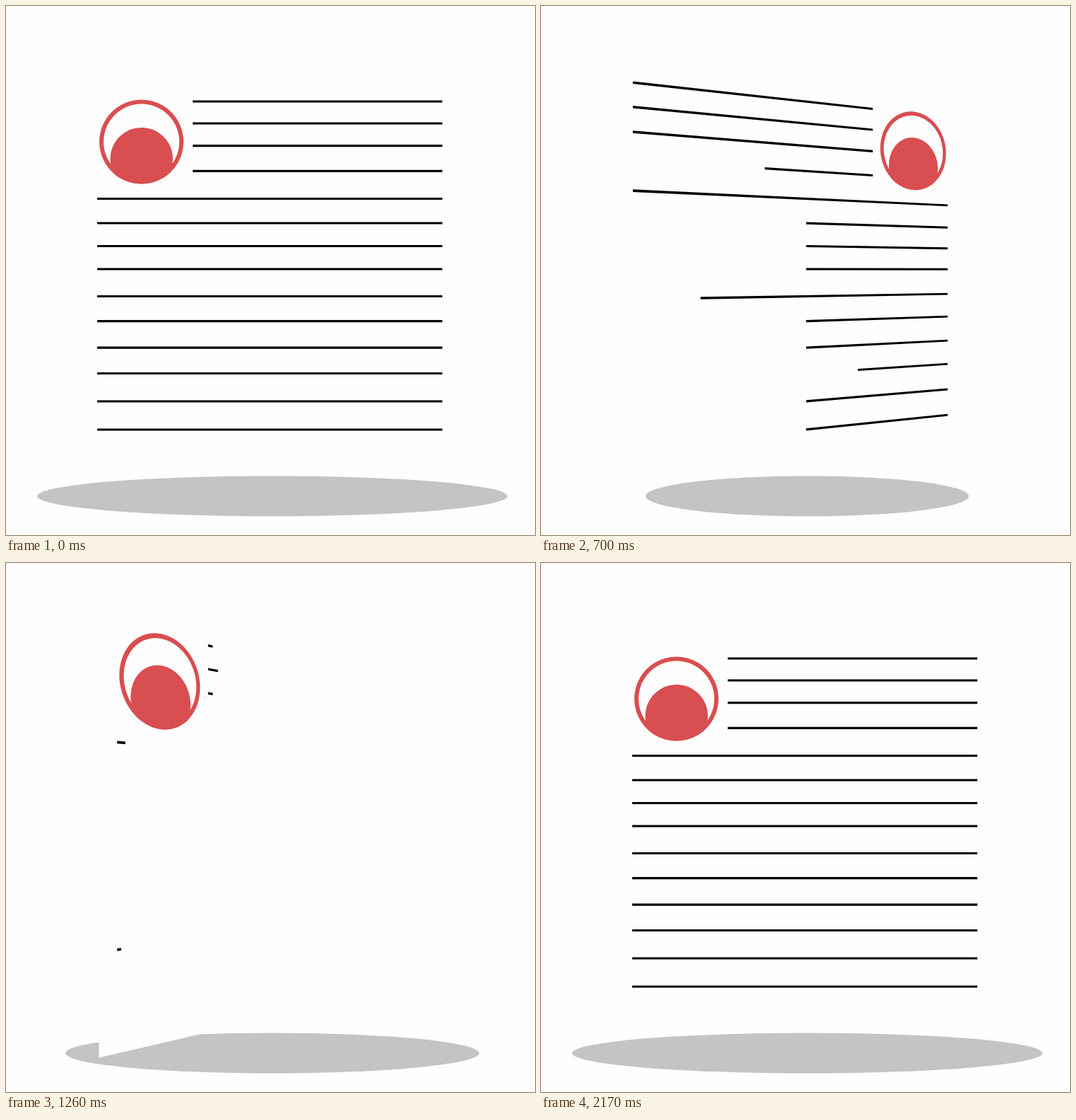
An HTML page with a canvas that plays this animation: 748x748 px, repeating every 4.2 s.

```html
<!DOCTYPE html>
<html lang="en">
<head>
<meta charset="utf-8">
<title>Spinning page</title>
<style>
  html, body { margin: 0; width: 100%; height: 100%; overflow: hidden; background: #fefefe; }
  canvas { display: block; }
</style>
</head>
<body>
<canvas id="stage" width="748" height="748"></canvas>
<script>
const ctx = document.getElementById('stage').getContext('2d');
const LOOP = 4200, STEP = 70;
const CENTER = 374, HALF = 269, DEPTH = 1034;

// Each line: y, left end, delay of its shrink and regrow
const LINES = [
  [135, 264, 206], [166, 264, 276], [197.7, 264, 206], [233.3, 264, 66],
  [272.5, 129, 210], [307, 129, 70], [339.5, 129, 70], [372, 129, 70],
  [410.5, 129, 140], [445.7, 129, 70], [483.2, 129, 70], [519.5, 129, 0],
  [559, 129, 70], [599, 129, 70]
];
const LINE_END = 617, LINE_HALF = 1.6;

// Cubic Bezier easing with handles (x1, 0) and (x2, 1)
function ease(t, start, duration, x1, x2) {
  const x = (t - start) / duration;
  if (x <= 0) return 0;
  if (x >= 1) return 1;
  let low = 0, high = 1;
  for (let i = 0; i < 30; i++) {
    const u = (low + high) / 2, v = 1 - u;
    if (3 * u * v * v * x1 + 3 * u * u * v * x2 + u * u * u < x) low = u;
    else high = u;
  }
  return low * low * (3 - 2 * low);
}

function lineLength(t) {
  const shrunk = 1 - ease(t, 513, 710, 0.106, 0);
  const grown = ease(t, 1226, 618, 0.275, 0.895);
  return Math.max(shrunk, grown);
}

function shadowRadius(t) {
  return Math.min(332.5, Math.max(332.5 - 0.299 * (t - 281), 332.5 - 0.1143 * (1610 - t)));
}

// Linear rise to 1 at peak, then fall back to 0
function pulse(t, start, peak, end) {
  return Math.max(0, Math.min((t - start) / (peak - start), (end - t) / (end - peak)));
}

function circle(cx, cy, r) {
  return Array.from({ length: 96 }, (_, i) => {
    const a = i / 96 * 2 * Math.PI;
    return [cx + r * Math.cos(a), cy + r * Math.sin(a)];
  });
}

function box(left, top, right, bottom) {
  return [[left, top], [right, top], [right, bottom], [left, bottom]];
}

function draw(t) {
  const angle = 2 * Math.PI * ease(t, 281, 1872, 0.322, 0);
  const cos = Math.cos(angle), sin = Math.sin(angle);
  const light = 1 - 0.2 * Math.max(pulse(t, 490, 630, 700), pulse(t, 700, 840, 980));
  const shaded = rgb => `rgb(${rgb.map(c => Math.round(c * light))})`;

  function trace(...shapes) {
    ctx.beginPath();
    for (const shape of shapes) {
      shape.forEach(([x, y], i) => {
        const dx = x - CENTER, scale = DEPTH / (DEPTH - dx * sin);
        const px = CENTER + dx * cos * scale, py = CENTER + (y - CENTER) * scale;
        if (i) ctx.lineTo(px, py); else ctx.moveTo(px, py);
      });
      ctx.closePath();
    }
  }

  function fill(color, ...shapes) {
    trace(...shapes);
    ctx.fillStyle = color;
    ctx.fill('evenodd');
  }

  ctx.fillStyle = '#fefefe';
  ctx.fillRect(0, 0, 748, 748);

  ctx.fillStyle = '#c4c4c4';
  ctx.beginPath();
  ctx.ellipse(376.5, 693, shadowRadius(t), 28.5, 0, 0, 2 * Math.PI);
  ctx.fill();

  fill(shaded([254, 254, 254]), box(CENTER - HALF, CENTER - HALF, CENTER + HALF, CENTER + HALF));

  for (const [y, left, delay] of LINES) {
    const length = lineLength(t - delay);
    if (length < 0.008) continue;
    fill('#000', box(left, y - LINE_HALF, left + (LINE_END - left) * length, y + LINE_HALF));
  }

  const red = shaded([217, 78, 80]);
  const rim = circle(191.5, 192, 59.5);
  fill(red, rim, circle(191.5, 192, 53.5));
  ctx.save();
  trace(rim);
  ctx.clip();
  fill(red, circle(191.7, 216.2, 44.2));
  ctx.restore();
}

const origin = performance.now();
function tick() {
  const t = (performance.now() - origin) % LOOP;
  draw(Math.floor(t / STEP) * STEP);
  requestAnimationFrame(tick);
}
tick();
</script>
</body>
</html>
```
